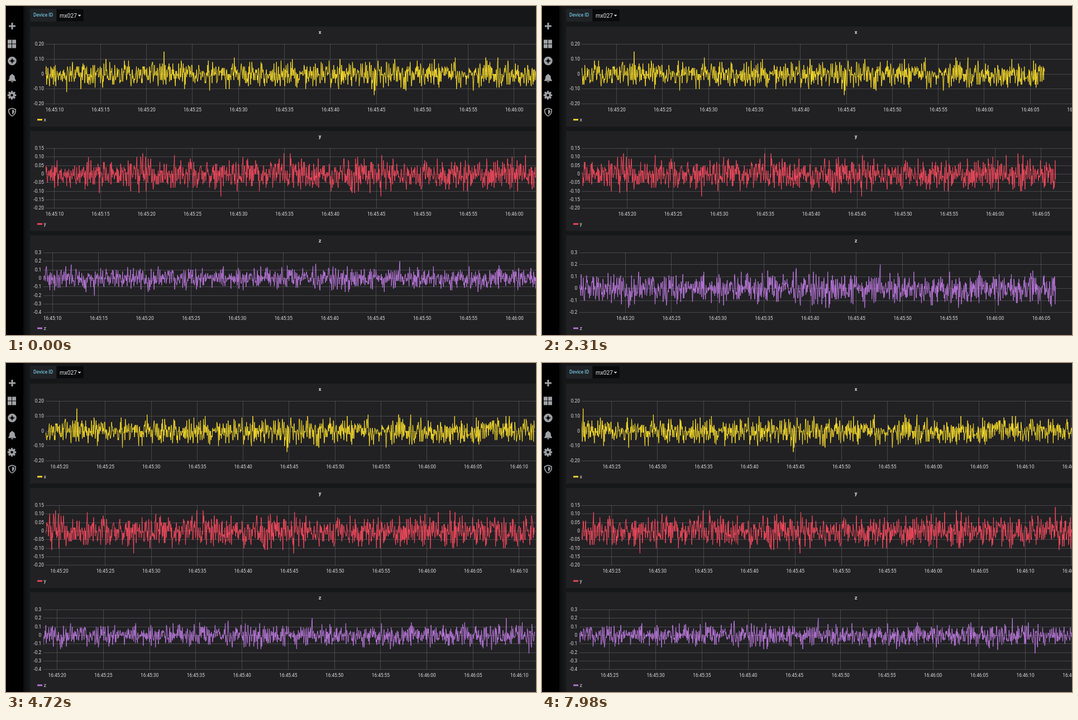
Animation of 949 by 590 pixels, one loop 8000 ms. Source, as an HTML page with a canvas:

```html
<!DOCTYPE html>
<html lang="en">
<head>
<meta charset="utf-8">
<title>Device dashboard</title>
<style>
  html, body { margin: 0; width: 100%; height: 100%; overflow: hidden; background: #161719; }
  canvas { display: block; }
</style>
</head>
<body>
<canvas id="stage" width="949" height="590"></canvas>
<script>
const ctx = document.getElementById('stage').getContext('2d');
const LOOP = 8000, WIDTH = 949, HEIGHT = 590;
const RATE = 22, FIRST = 8, LAST = 78;   // samples per second, data seconds after 16:45:00
const ICON = '#a0a1a3', LIGHT = '#d8d9da', GRID = 'rgba(200,200,200,.23)';

// Each refresh reaches the first chart at its start and the last chart at its end (ms).
const refreshes = [[210, 290], [1140, 1220], [2310, 2380], [3480, 3630], [4640, 4720],
  [5270, 5340], [5800, 5800], [6890, 6890], [7900, 7980]];
const arrivals = [
  ([start]) => start,
  ([start, end]) => Math.min(start + 80, end),
  ([, end]) => end
];

// Peaks are the few landmarks that stand out of the noise: [second, value].
const charts = [
  { name: 'x', color: '#fade2a', left: 71, labelRight: 68, pxPerSec: 16.46, spread: .085,
    max: .2, min: -.2, step: .1, digits: 2, peaks: [[21.9, .15], [44.75, -.14]] },
  { name: 'y', color: '#f2495c', left: 71, labelRight: 68, pxPerSec: 16.46, spread: .088,
    max: .15, min: -.2, step: .05, digits: 2, peaks: [[28.1, -.13], [45.5, -.13], [73.25, .14]] },
  { name: 'z', color: '#b877d9', left: 67, labelRight: 63.3, pxPerSec: 16.55, spread: .12,
    max: .3, min: -.2, step: .1, digits: 1, peaks: [[14.55, -.2], [47.6, .2], [68.6, .2], [71.05, -.21]] }
];

function seededRandom(seed) {
  return () => {
    seed = (seed + 0x6D2B79F5) | 0;
    let n = Math.imul(seed ^ seed >>> 15, 1 | seed);
    n ^= n + Math.imul(n ^ n >>> 7, 61 | n);
    return ((n ^ n >>> 14) >>> 0) / 4294967296;
  };
}

charts.forEach((chart, i) => {
  const random = seededRandom(i + 1);
  chart.top = 37 + 187 * i;
  chart.arrival = arrivals[i];
  chart.samples = Array.from({ length: (LAST - FIRST) * RATE }, (_, n) => {
    const noise = random() + random() + random() - 1.5;
    return { second: FIRST + n / RATE, value: Math.round(noise * chart.spread * 100) / 100 };
  });
  for (const [second, value] of chart.peaks) {
    chart.samples[Math.round((second - FIRST) * RATE)].value = value;
  }
});

// The time window follows the clock at every refresh; new data comes in bursts of 5.1 s.
function visibleWindow(chart, time) {
  const latest = refreshes.filter(refresh => chart.arrival(refresh) <= time).pop();
  const from = latest ? 13.91 + .992 * latest[0] / 1000 : 9.03;
  const burst = Math.max(0, Math.floor((from - 11.4) / 5.1));
  return { from, dataEnd: 66.6 + 5.1 * burst };
}

function rect(x, y, w, h, color) {
  ctx.fillStyle = color;
  ctx.fillRect(x, y, w, h);
}

function text(label, x, y, { size = 8.4, align = 'left', color = LIGHT, weight = 400 } = {}) {
  ctx.font = `${weight} ${size}px Roboto, sans-serif`;
  ctx.textAlign = align;
  ctx.fillStyle = color;
  ctx.fillText(label, x, y);
}

function fillPath(d, color) {
  ctx.fillStyle = color;
  ctx.fill(new Path2D(d), 'evenodd');
}

function disc(x, y, r, color) {
  ctx.fillStyle = color;
  ctx.beginPath();
  ctx.arc(x, y, r, 0, 2 * Math.PI);
  ctx.fill();
}

function rotated(x, y, count, drawPart) {
  ctx.save();
  ctx.translate(x, y);
  for (let i = 0; i < count; i++) {
    drawPart(i);
    ctx.rotate(2 * Math.PI / count);
  }
  ctx.restore();
}

function drawSidebar() {
  rect(0, 0, 31, HEIGHT, '#000');
  const shadow = ctx.createLinearGradient(31, 0, 39, 0);
  shadow.addColorStop(0, 'rgba(0,0,0,.45)');
  shadow.addColorStop(1, 'rgba(0,0,0,0)');
  rect(31, 0, 8, HEIGHT, shadow);

  // Plus, dashboards, compass
  rect(5, 34.5, 12, 3, ICON);
  rect(9.5, 30, 3, 12, ICON);
  for (const x of [3, 11]) for (const y of [60.5, 68.5]) rect(x, y, 7, 7, ICON);
  disc(11, 98.5, 7.8, ICON);
  rotated(11, 98.5, 8, i => fillPath(i % 2 ? 'M-1.2 0 L0 -4 L1.2 0Z' : 'M-1.5 0 L0 -5.8 L1.5 0Z', '#000'));

  // Bell
  fillPath('M11 121.5 Q12 121.5 12 123 Q15.8 124 15.8 128 Q15.8 132 18 133.5 V134.5 H4 V133.5 Q6.2 132 6.2 128 Q6.2 124 10 123 Q10 121.5 11 121.5Z M9 135.3 H13 Q12.6 137 11 137 Q9.4 137 9 135.3Z', ICON);

  // Gear
  rotated(10.5, 160, 8, () => rect(-1.7, -7.7, 3.4, 4, ICON));
  disc(10.5, 160, 5.6, ICON);
  disc(10.5, 160, 2.3, '#000');

  // Shield
  fillPath('M11 182.5 L18 185 V189 Q17.5 195 11 198.3 Q4.5 195 4 189 V185Z M11 184.3 L5.7 186.2 V189 Q6.2 193.8 11 196.4 Q15.8 193.8 16.3 189 V186.2Z', ICON);
  fillPath('M11 186 L14.8 187.4 V189 Q14.4 192.7 11 194.7Z', ICON);
}

function drawPicker() {
  rect(43, 5, 47, 23, '#202226');
  rect(90, 5, 49.5, 23, '#1c1d20');
  rect(90.5, 5.5, 48.5, 22, '#090a0c');
  text('Device ID', 49, 19.3, { size: 8.45, weight: 500, color: '#6fbfd8' });
  text('mx027', 96, 20.8, { size: 10.1, color: '#e3e4e6' });
  fillPath('M128.8 15.8 H134.4 L131.6 18.8Z', '#e3e4e6');
}

function clock(second) {
  const pad = n => String(n).padStart(2, '0');
  return `16:${pad(45 + Math.floor(second / 60))}:${pad(second % 60)}`;
}

function drawChart(chart, time) {
  const { name, color, top, left, labelRight, pxPerSec, max, step, digits } = chart;
  const { from, dataEnd } = visibleWindow(chart, time);
  const shown = chart.samples.filter(({ second }) => second >= from - 1 / RATE && second <= dataEnd);

  // The axis doubles its lower half when a value reaches the bottom.
  const lowest = Math.min(...shown.map(({ value }) => value));
  const min = lowest <= chart.min ? 2 * chart.min : chart.min;
  const plotTop = top + 31, plotHeight = 107.5;
  const toX = second => left + (second - from) * pxPerSec;
  const toY = value => plotTop + .3 + (max - value) / (max - min) * plotHeight;

  rect(43, top, WIDTH - 43, 179.5, '#212124');
  text(name, 562, top + 12.6, { size: 9.3, weight: 700, align: 'center' });

  const rows = Math.round((max - min) / step);
  for (let i = 0; i <= rows; i++) {
    const value = max - i * step, y = toY(value);
    rect(left, Math.floor(y), WIDTH - left, 1, GRID);
    text(Math.abs(value) < 1e-6 ? '0' : value.toFixed(digits), labelRight, y + 2.5, { align: 'right' });
  }

  for (let second = 5 * Math.ceil(from / 5); toX(second) < WIDTH + 20; second += 5) {
    const x = toX(second);
    rect(Math.floor(x), plotTop, 1, plotHeight + .5, GRID);
    text(clock(second), x, top + 151.7, { align: 'center' });
  }

  ctx.save();
  ctx.beginPath();
  ctx.rect(left, plotTop, WIDTH - left, plotHeight + 1);
  ctx.clip();
  ctx.beginPath();
  for (const { second, value } of shown) ctx.lineTo(toX(second), toY(value));
  ctx.strokeStyle = color;
  ctx.lineWidth = 1;
  ctx.lineJoin = 'round';
  ctx.stroke();
  ctx.restore();

  rect(56, top + 165.5, 9, 2.8, color);
  text(name, 67.6, top + 169.6, { size: 9 });
}

const start = performance.now();
function draw() {
  const time = (performance.now() - start) % LOOP;
  rect(0, 0, WIDTH, HEIGHT, '#161719');
  drawSidebar();
  drawPicker();
  charts.forEach(chart => drawChart(chart, time));
  requestAnimationFrame(draw);
}
draw();
</script>
</body>
</html>
```
